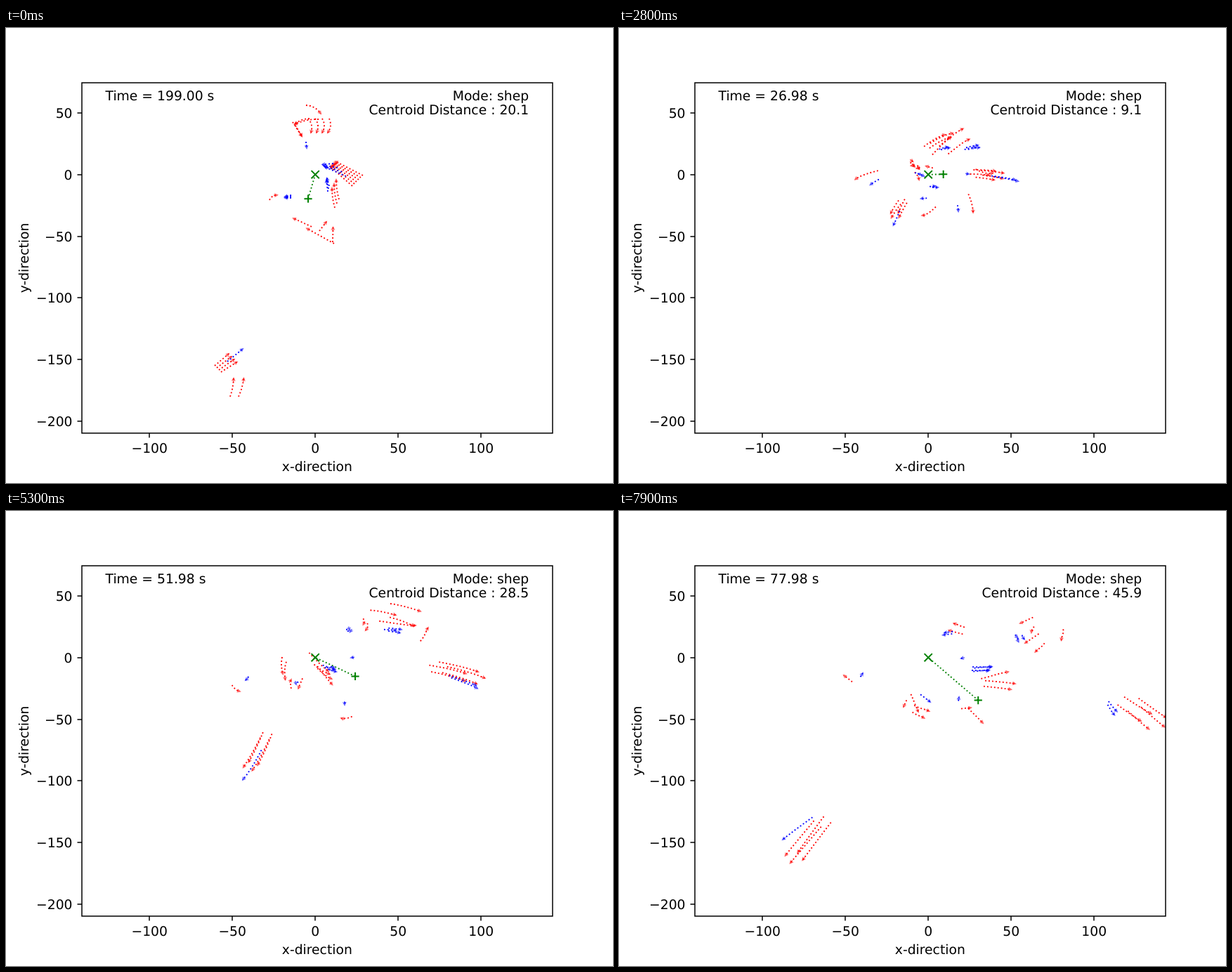
An HTML page for the animation above (8000 ms loop, 864 px wide and 648 px high).

```html
<!DOCTYPE html>
<html lang="en">
<head>
<meta charset="utf-8">
<title>Herding simulation</title>
<style>
  html, body { margin: 0; width: 100%; height: 100%; overflow: hidden; background: #fff; }
  svg { display: block; width: 864px; height: 648px; }
  text { font: 18.75px "DejaVu Sans", sans-serif; fill: #000; text-rendering: geometricPrecision; }
  .axis { fill: none; stroke: #000; stroke-width: 1.5; }
  .trail { fill: none; stroke-width: 1.875; stroke-dasharray: 1.875 3.094; }
  .mark { fill: none; stroke: #008000; stroke-width: 2; }
</style>
</head>
<body>
<svg viewBox="0 0 864 648">
  <defs><clipPath id="box"><rect x="108" y="78" width="670" height="499"/></clipPath></defs>
  <g id="plot" clip-path="url(#box)"></g>
  <g id="frame"></g>
</svg>
<script>
const NS = "http://www.w3.org/2000/svg";
const STEP = 100, STEPS = 80, TRAIL = 10;
const FIRST = 2, LAST = 79;
const RED = "#f00", BLUE = "#00f";
const plot = document.getElementById("plot");
const frame = document.getElementById("frame");
const px = u => 440.2 + 2.36 * u;
const py = u => 208.7 - 1.757 * u;

function make(tag, attrs, parent, text) {
  const el = document.createElementNS(NS, tag);
  for (const k in attrs) el.setAttribute(k, attrs[k]);
  if (text) el.textContent = text;
  parent.appendChild(el);
  return el;
}
const label = (x, y, anchor, text) =>
  make("text", { x, y, "text-anchor": anchor }, frame, text);
const minus = v => String(v).replace("-", "\u2212");

// Axes
make("rect", { class: "axis", x: 108, y: 78, width: 670, height: 499 }, frame);
for (let v = -100; v <= 100; v += 50) {
  make("path", { class: "axis", d: `M${Math.round(px(v))} 577v6.5` }, frame);
  label(px(v), 604.5, "middle", minus(v));
}
for (let v = -200; v <= 50; v += 50) {
  make("path", { class: "axis", d: `M108 ${Math.round(py(v))}h-6.5` }, frame);
  label(94.5, py(v) + 7, "end", minus(v));
}
label(442.8, 631, "middle", "x-direction");
make("text", { transform: "translate(31.5 327.5) rotate(-90)", "text-anchor": "middle" }, frame, "y-direction");
const clock = label(141.5, 102.7, "start");
label(744.2, 102.7, "end", "Mode: shep");
const gap = label(744.2, 122.7, "end");

// Smooth curve through timed values
function curve(times, vals) {
  const last = times.length - 1;
  const slope = i => {
    const a = Math.max(0, i - 1), b = Math.min(last, i + 1);
    return (vals[b] - vals[a]) / (times[b] - times[a]);
  };
  return t => {
    let i = 0;
    while (i < last - 1 && t > times[i + 1]) i++;
    const h = times[i + 1] - times[i], s = (t - times[i]) / h, r = 1 - s;
    return r * r * ((1 + 2 * s) * vals[i] + s * h * slope(i)) +
           s * s * ((3 - 2 * s) * vals[i + 1] - r * h * slope(i + 1));
  };
}

// Waypoints are evenly spaced in time
function route(xy) {
  const gaps = xy.length / 2 - 1;
  const times = Array.from({ length: gaps + 1 }, (_, i) => FIRST + (LAST - FIRST) * i / gaps);
  const x = curve(times, xy.filter((_, i) => i % 2 === 0));
  const y = curve(times, xy.filter((_, i) => i % 2));
  return t => [x(t), y(t)];
}

function sprite(color, parent) {
  const line = make("polyline", { class: "trail", stroke: color }, parent);
  const head = make("path", { d: "M-5-.8H-3L-4-3 2 0-4 3-3 .8H-5z", fill: color, opacity: .6 }, parent);
  return pts => {
    const [x, y] = pts[pts.length - 1], [u, v] = pts[pts.length - 2];
    const turn = Math.atan2(y - v, x - u) * 180 / Math.PI;
    line.setAttribute("points", pts.map(p => p[0].toFixed(1) + "," + p[1].toFixed(1)).join(" "));
    head.setAttribute("transform", `translate(${x} ${y}) rotate(${turn})`);
  };
}

// A flock shares one route; its members circle slowly and drift apart
const run = make("g", {}, plot);
const agents = [];
function flock(color, count, spread, ...xy) {
  const lead = route(xy);
  for (let i = 0; i < count; i++) {
    const at = t => {
      const [x, y] = lead(t);
      const r = spread * (.5 + t / STEPS), a = 2 * Math.PI * i / count + t / 40;
      return [x + r * Math.cos(a), y + .6 * r * Math.sin(a)];
    };
    agents.push({ at, draw: sprite(color, run) });
  }
}

// north
flock(RED, 3, 18, 430,188, 449,182, 486,153, 528,141, 576,152, 608,170, 603,186);
flock(RED, 2, 6, 420,187, 431,175, 467,154, 508,155, 510,166, 495,171, 473,165);
flock(RED, 1, 0, 432,180, 436,169, 474,150, 519,155, 584,163, 592,151, 571,160);
// east
flock(RED, 1, 0, 475,196, 501,199, 531,207, 584,190, 601,166, 601,172, 578,188);
flock(RED, 5, 13, 476,207, 537,210, 668,238, 762,300);
// centre
flock(RED, 2, 6, 430,212, 425,200, 420,198, 398,207, 396,237, 414,277, 438,290);
flock(RED, 1, 0, 404,190, 427,216, 416,253, 405,279);
flock(RED, 1, 0, 421,214, 418,190, 465,248, 518,302);
flock(RED, 1, 0, 452,203, 445,199, 428,198, 482,241, 554,229);
flock(RED, 2, 5, 428,193, 424,199, 463,236, 561,250);
// west and south
flock(RED, 1, 0, 397,200, 378,201, 337,215, 321,244, 333,257, 334,246, 320,234);
flock(RED, 1, 0, 456,235, 455,250, 432,267, 408,256, 406,240, 413,255, 426,286);
flock(RED, 1, 0, 478,231, 494,231, 504,262, 496,290, 477,295, 484,283, 501,280);
flock(RED, 4, 9, 418,228, 393,266, 347,365, 249,494);
// herders
flock(BLUE, 1, 0, 393,203, 358,223, 341,241, 347,231);
flock(BLUE, 1, 0, 405,240, 391,280, 336,384, 233,468);
flock(BLUE, 1, 0, 453,242, 430,243, 413,247, 443,272);
flock(BLUE, 1, 0, 479,236, 483,261, 482,276, 484,265);
flock(BLUE, 1, 0, 485,208, 498,208, 491,209, 487,210);
flock(BLUE, 2, 3, 482,206, 565,217, 671,251, 707,288);
flock(BLUE, 3, 4, 470,180, 510,169, 560,171, 571,183);
flock(BLUE, 2, 2, 434,180, 469,170, 489,171, 462,175);
flock(BLUE, 2, 3, 412,203, 432,210, 470,227, 529,224);
flock(BLUE, 2, 3, 430,227, 452,226, 468,224, 528,225);

// Closing picture of the previous run: rows of trails from one line to another
const finale = make("g", {}, plot);
function row(color, count, from, to, step = [0, 0], close = 1, bend = 0) {
  for (let i = 0; i < count; i++) {
    const [a, b] = from.map((v, k) => v + step[k] * i);
    const [c, d] = to.map((v, k) => v + step[k] * i * close);
    const len = Math.hypot(c - a, d - b), pts = [];
    for (let s = 0; s <= 1; s += .125) {
      const k = 4 * bend * s * (1 - s) / len;
      pts.push([a + (c - a) * s + (d - b) * k, b + (d - b) * s - (c - a) * k]);
    }
    sprite(color, finale)(pts);
  }
}
row(RED, 1, [427, 110], [448, 122], [0, 0], 1, 3);
row(RED, 4, [430, 129], [434, 149], [10, 0], .8, 3);
row(RED, 2, [408, 134], [421, 154], [4, 5], 0);
row(RED, 2, [432, 129], [411, 137], [13, 1], 0, -2);
row(RED, 6, [508, 210], [469, 190], [-3, 3], .5);
row(RED, 3, [468, 256], [464, 228], [3, -6], 1, 1);
row(RED, 1, [375, 245], [386, 238], [0, 0], 1, 2);
row(RED, 2, [435, 283], [409, 271], [32, 24], .6);
row(RED, 2, [446, 289], [456, 276], [19, 16], .5);
row(RED, 4, [297, 481], [317, 464], [3, 3], 1.3);
row(RED, 2, [319, 525], [324, 499], [12, 0], 1.2, -1);
row(BLUE, 1, [427, 162], [428, 171]);
row(BLUE, 3, [406, 238], [397, 240], [0, 2], .5);
row(BLUE, 4, [484, 211], [454, 198], [-6, -6], .2);
row(BLUE, 3, [458, 233], [456, 217], [1, -4], .4);
row(BLUE, 1, [315, 475], [337, 457]);

// Goal, centroid and the line between them
const link = make("line", { class: "trail", stroke: "#008000", x2: px(0), y2: py(0) }, plot);
make("path", { class: "mark", d: "M-5.6-5.6 5.6 5.6M-5.6 5.6 5.6-5.6", transform: `translate(${px(0)} ${py(0)})` }, plot);
const plus = make("path", { class: "mark", d: "M-5.6 0H5.6M0-5.6V5.6" }, plot);
const midTimes = [1, 12, 28, 37, 53, 70, 79];
const midX = curve(midTimes, [.8, 2.5, 9.1, 14.3, 24.1, 30.75, 30.1]);
const midY = curve(midTimes, [1, 1.25, .2, -3.4, -15.2, -29.35, -34.65]);

function show(n) {
  const end = n === 0;
  finale.style.display = end ? "" : "none";
  run.style.display = end ? "none" : "";
  const [mx, my] = end ? [-4.3, -19.6] : [midX(n), midY(n)];
  link.setAttribute("x1", px(mx));
  link.setAttribute("y1", py(my));
  plus.setAttribute("transform", `translate(${px(mx)} ${py(my)})`);
  clock.textContent = `Time = ${(end ? 199 : Math.max(0, n - 1.02)).toFixed(2)} s`;
  gap.textContent = `Centroid Distance : ${Math.hypot(mx, my).toFixed(1)}`;
  if (end) return;
  const from = Math.min(n - .1, Math.max(1, n - TRAIL));
  for (const { at, draw } of agents) {
    const pts = [];
    for (let t = from; t < n; t++) pts.push(at(t));
    pts.push(at(n));
    draw(pts);
  }
}

let shown = -1;
const begin = performance.now();
function tick() {
  const n = Math.floor((performance.now() - begin) / STEP) % STEPS;
  if (n !== shown) show(shown = n);
  requestAnimationFrame(tick);
}
tick();
</script>
</body>
</html>
```
